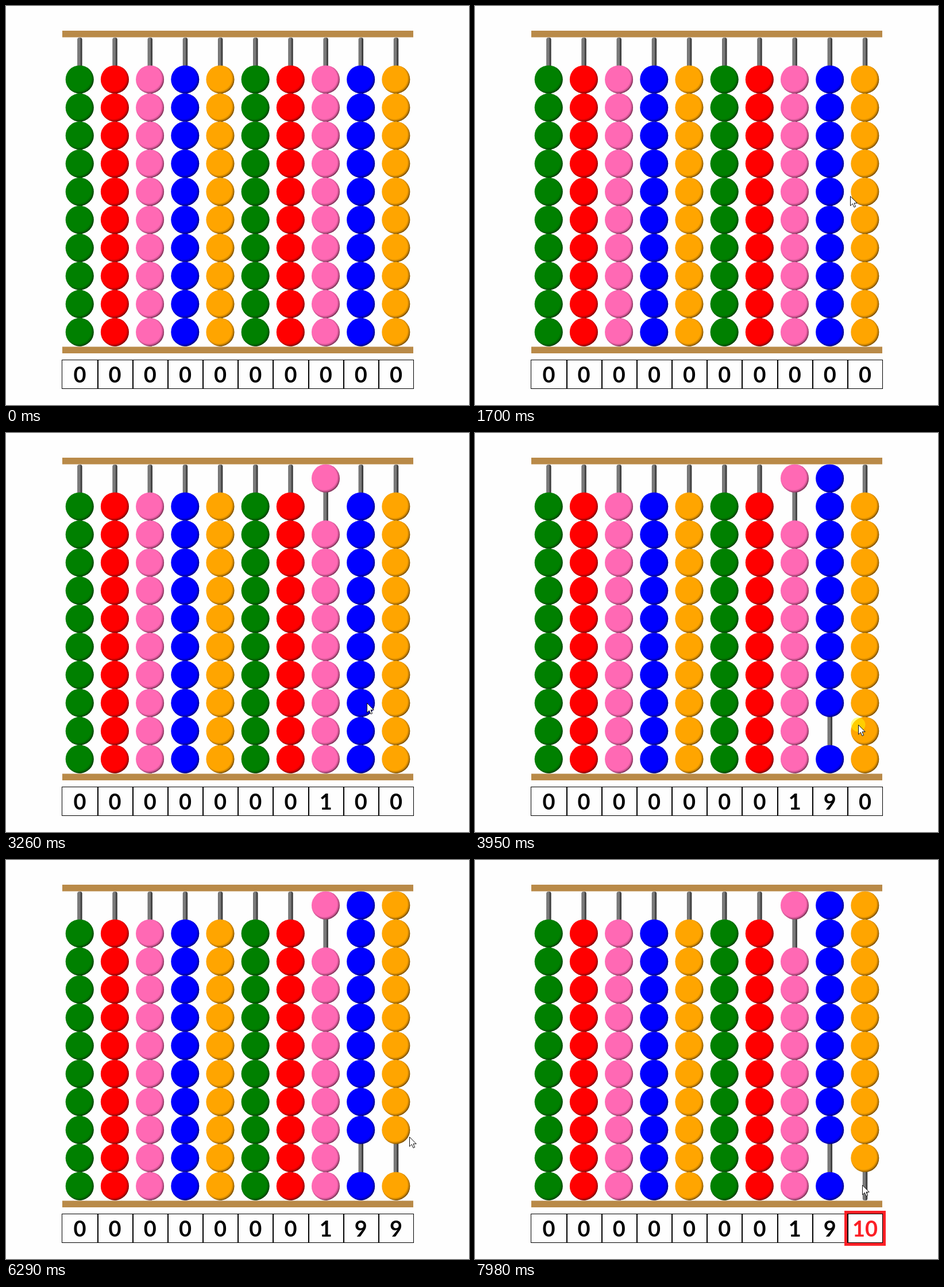
An HTML page that plays this animation: 806 by 695 pixels, repeating every 8 s.

```html
<!DOCTYPE html>
<html lang="en">
<head>
<meta charset="utf-8">
<title>Abacus</title>
<style>
  html, body { margin: 0; width: 100%; height: 100%; overflow: hidden; background: #fefefe; }
  svg { display: block; width: 806px; height: 695px; }
  text { font: 700 38px Lato, sans-serif; text-anchor: middle; }
</style>
</head>
<body>
<svg id="stage" viewBox="0 0 806 695" xmlns="http://www.w3.org/2000/svg">
  <defs>
    <linearGradient id="metal">
      <stop offset="0" stop-color="#666"/>
      <stop offset=".3" stop-color="#808080"/>
      <stop offset=".6" stop-color="#707070"/>
      <stop offset=".75" stop-color="#444"/>
      <stop offset="1" stop-color="#333"/>
    </linearGradient>
    <radialGradient id="shade" cx=".455" cy=".455" r=".56">
      <stop offset=".8" stop-color="#000" stop-opacity="0"/>
      <stop offset=".9" stop-color="#000" stop-opacity=".22"/>
      <stop offset="1" stop-color="#000" stop-opacity=".6"/>
    </radialGradient>
  </defs>
  <g id="rods"></g>
  <g id="beads"></g>
  <path d="M98 43H709V54.5H98ZM98 593.5H709V605H98Z" fill="#b98a48"/>
  <g id="cells"></g>
  <rect id="alarm" x="645.5" y="613.5" width="67" height="56" fill="none" stroke="#fb2026" stroke-width="5"/>
  <circle id="glow" r="12.5" fill="#ff0" fill-opacity=".46"/>
  <path id="cursor" d="M.5 .5V17L4.3 13.4L7 19.5L9.6 18.4L7 12.4H12.2Z" fill="#fff" stroke="#111"/>
</svg>
<script>
const DURATION = 8000;
const COLUMNS = 10, BEADS = 10, PITCH = 61.18, FIRST_X = 128.2;
const BEAD_STEP = 48.9, TOP_Y = 79;
const COLORS = ["#008000", "#ff0000", "#ff69b4", "#0000ff", "#ffa500"];
const RED = "#fb2026";
const PRESS = 90;

// A press glows under the pointer; its release raises `count` beads.
const press = (time, column, count) => ({ time, column, count });
const presses = [press(2560, 7, 1), press(3480, 8, 9), press(3950, 9, 9), press(7890, 9, 10)];

// The pointer rests between glides.
const glide = (start, end, x, y) => ({ start, end, x, y });
const ENTRY = { x: 553, y: -10 };
const glides = [
  glide(500, 840, 565, 31),
  glide(1360, 1950, 672, 518),
  glide(1950, 2510, 561, 131),
  glide(2700, 2990, 568, 131),
  glide(3030, 3318, 630, 508),
  glide(3650, 3950, 667, 508),
  glide(4040, 4180, 671, 506),
  glide(5170, 5380, 677, 500),
  glide(5660, 6100, 709, 488),
  glide(6100, 6430, 701, 479),
  glide(6480, 6570, 674, 472),
  glide(6950, 7180, 674, 566)
];

const byId = id => document.getElementById(id);
function add(parent, tag, attrs) {
  const node = document.createElementNS("http://www.w3.org/2000/svg", tag);
  for (const key in attrs) node.setAttribute(key, attrs[key]);
  return byId(parent).appendChild(node);
}

function makeColumn(c) {
  const x = FIRST_X + c * PITCH;
  add("rods", "rect", { x: x - 4, y: 55, width: 8.4, height: 538, rx: 3.5, fill: "url(#metal)" });
  const beads = Array.from({ length: BEADS }, () =>
    [COLORS[c % COLORS.length], "url(#shade)"].map(fill =>
      add("beads", "circle", { cx: x, r: 24.5, fill })));
  if (c) {
    const edge = Math.round(x - PITCH / 2 + 0.8);
    add("cells", "path", { d: `M${edge} 616V667`, stroke: "#000", "stroke-width": 2 });
  }
  const label = add("cells", "text", { x: x + 0.2, y: 655.5 });
  return { beads, label, count: -1 };
}
const columns = Array.from({ length: COLUMNS }, (_, c) => makeColumn(c));
add("cells", "rect", { x: 97.5, y: 616.5, width: 612, height: 50, fill: "none", stroke: "#000" });

function setCount(column, count) {
  if (column.count === count) return;
  column.count = count;
  column.beads.forEach((layers, k) => {
    const y = TOP_Y + BEAD_STEP * (k < count ? k : k + 1);
    layers.forEach(layer => layer.setAttribute("cy", y));
  });
  column.label.textContent = count;
  column.label.setAttribute("fill", count > 9 ? RED : "#000");
}

// Sideways motion leads and eases out; vertical motion eases both ways.
function pointerAt(time) {
  let { x, y } = ENTRY;
  for (const move of glides) {
    const u = Math.min(1, Math.max(0, (time - move.start) / (move.end - move.start)));
    x += (move.x - x) * u * (2 - u);
    y += (move.y - y) * u * u * (3 - 2 * u);
  }
  return [Math.round(x), Math.round(y)];
}

function show(id, visible) {
  byId(id).setAttribute("visibility", visible ? "visible" : "hidden");
}

function render(time) {
  const counts = Array(COLUMNS).fill(0);
  for (const { time: at, column, count } of presses) {
    if (time >= at + PRESS) counts[column] = count;
  }
  columns.forEach((column, c) => setCount(column, counts[c]));
  show("alarm", counts[COLUMNS - 1] > 9);
  show("cursor", time >= glides[0].start);
  show("glow", presses.some(p => time >= p.time && time < p.time + PRESS));
  const place = `translate(${pointerAt(time)})`;
  byId("cursor").setAttribute("transform", place);
  byId("glow").setAttribute("transform", place);
}

const start = performance.now();
function tick() {
  render((performance.now() - start) % DURATION);
  requestAnimationFrame(tick);
}
tick();
</script>
</body>
</html>
```
